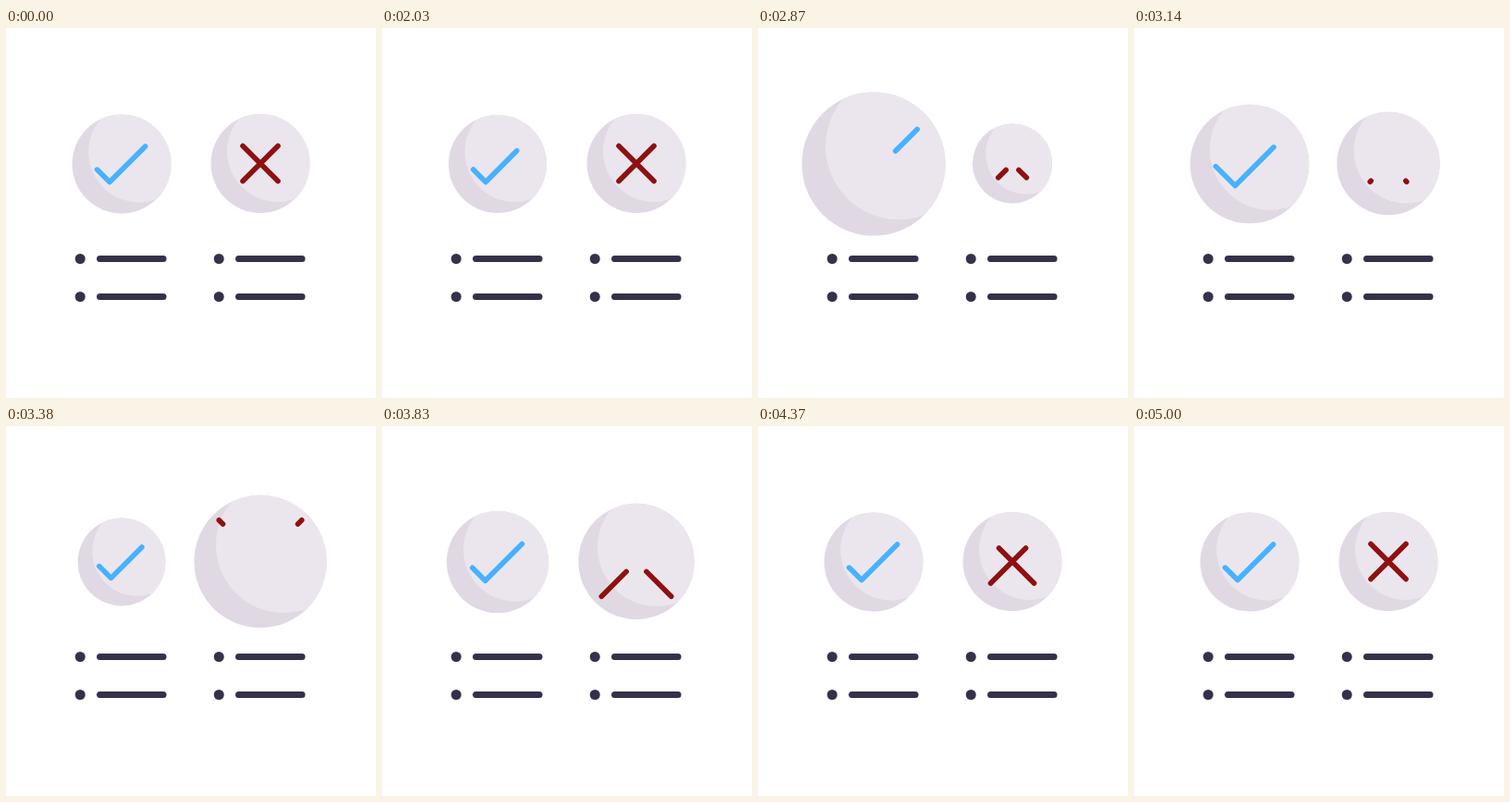
Write an HTML page with a canvas that moves like this. It is 400 px wide and 400 px high and loops after 5120 ms.

```html
<!DOCTYPE html>
<html lang="en">
<head>
<meta charset="utf-8">
<title>Yes and no lists</title>
<style>
html, body { margin: 0; width: 100%; height: 100%; overflow: hidden; background: #fff; }
canvas { display: block; width: 400px; height: 400px; }
</style>
</head>
<body>
<canvas id="stage" width="400" height="400"></canvas>
<script>
const ctx = document.getElementById('stage').getContext('2d');
const LOOP = 5120, START = 2030, END = 5000, STEP = 30;
const RADIUS = 53.5, ERASE = 735;
const INK = '#35314a';

// Swings between turning points [time, value] with a sine ease.
function swing(...turns) {
  return t => {
    const i = turns.findIndex(([time]) => time > t);
    if (i < 0) return turns[turns.length - 1][1];
    if (i === 0) return turns[0][1];
    const [t0, v0] = turns[i - 1], [t1, v1] = turns[i];
    return v0 + (v1 - v0) * (1 - Math.cos(Math.PI * (t - t0) / (t1 - t0))) / 2;
  };
}

// from..to is the part of each path shown at rest, min..max its full reach.
const yes = {
  x: 125, y: 147, color: '#47b1ff', erase: 1996,
  from: -13.5, to: 38.6, min: -18, max: 45.5,
  paths: [v => [-13 + v, 19.6 - Math.abs(v)]],
  radius: swing([1996, RADIUS], [2250, 43], [2890, 77.7], [3440, 46.5], [3980, 57], [4370, RADIUS]),
  slide: swing([2750, 59.5], [3100, -4], [3510, 0])
};

const no = {
  x: 275, y: 146.5, color: '#8f1010', erase: 2520,
  from: -19, to: 19, min: -32.2, max: 33.4,
  paths: [v => [v, -v], v => [-v, -v]],
  radius: swing([2520, RADIUS], [2850, 43], [3520, 75], [4160, 49], [4580, 58], [END, RADIUS]),
  slide: swing([3315, 52.5], [3820, -28.3], [4564, 0])
};

function disc(x, y, r, color) {
  ctx.fillStyle = color;
  ctx.beginPath();
  ctx.arc(x, y, r, 0, Math.PI * 2);
  ctx.fill();
}

function line(points, width, color) {
  ctx.lineWidth = width;
  ctx.strokeStyle = color;
  ctx.beginPath();
  points.forEach(([x, y]) => ctx.lineTo(x, y));
  ctx.stroke();
}

// Visible part of the mark: first wiped from its end, then slid back in.
function span({ from, to, min, max, erase, slide }, t) {
  const x = Math.max(0, (t - erase) / ERASE);
  if (x < 1) return [from, from + (to - from) * (1 - x) ** 2];
  const d = slide(t);
  return [Math.max(min, from + d), Math.min(max, to + d)];
}

function drawBadge(badge, t) {
  const r = badge.radius(t), k = r / RADIUS;
  ctx.save();
  ctx.translate(badge.x, badge.y);
  disc(0, 0, r, '#e0d9e4');
  ctx.save();
  ctx.clip();
  disc(18.8 * k, -13.2 * k, 54.6 * k, '#ebe6ee');
  ctx.restore();

  const [a, b] = span(badge, t);
  if (b - a > 0.05) {
    const stops = a < 0 && b > 0 ? [a, 0, b] : [a, b];
    for (const path of badge.paths) {
      line(stops.map(v => path(v).map(c => c * k)), 5.6, badge.color);
    }
  }
  ctx.restore();
}

function drawList(x) {
  for (const y of [249.5, 290.5]) {
    disc(x, y, 5.5, INK);
    line([[x + 21.3, y], [x + 89.8, y]], 7, INK);
  }
}

function draw(t) {
  ctx.fillStyle = '#fff';
  ctx.fillRect(0, 0, 400, 400);
  ctx.lineCap = ctx.lineJoin = 'round';
  const time = t < START ? 0 : Math.min(END, START + Math.floor((t - START) / STEP) * STEP);
  drawBadge(yes, time);
  drawBadge(no, time);
  drawList(80.2);
  drawList(230.2);
}

const origin = performance.now();
function tick() {
  draw((performance.now() - origin) % LOOP);
  requestAnimationFrame(tick);
}
tick();
</script>
</body>
</html>
```
